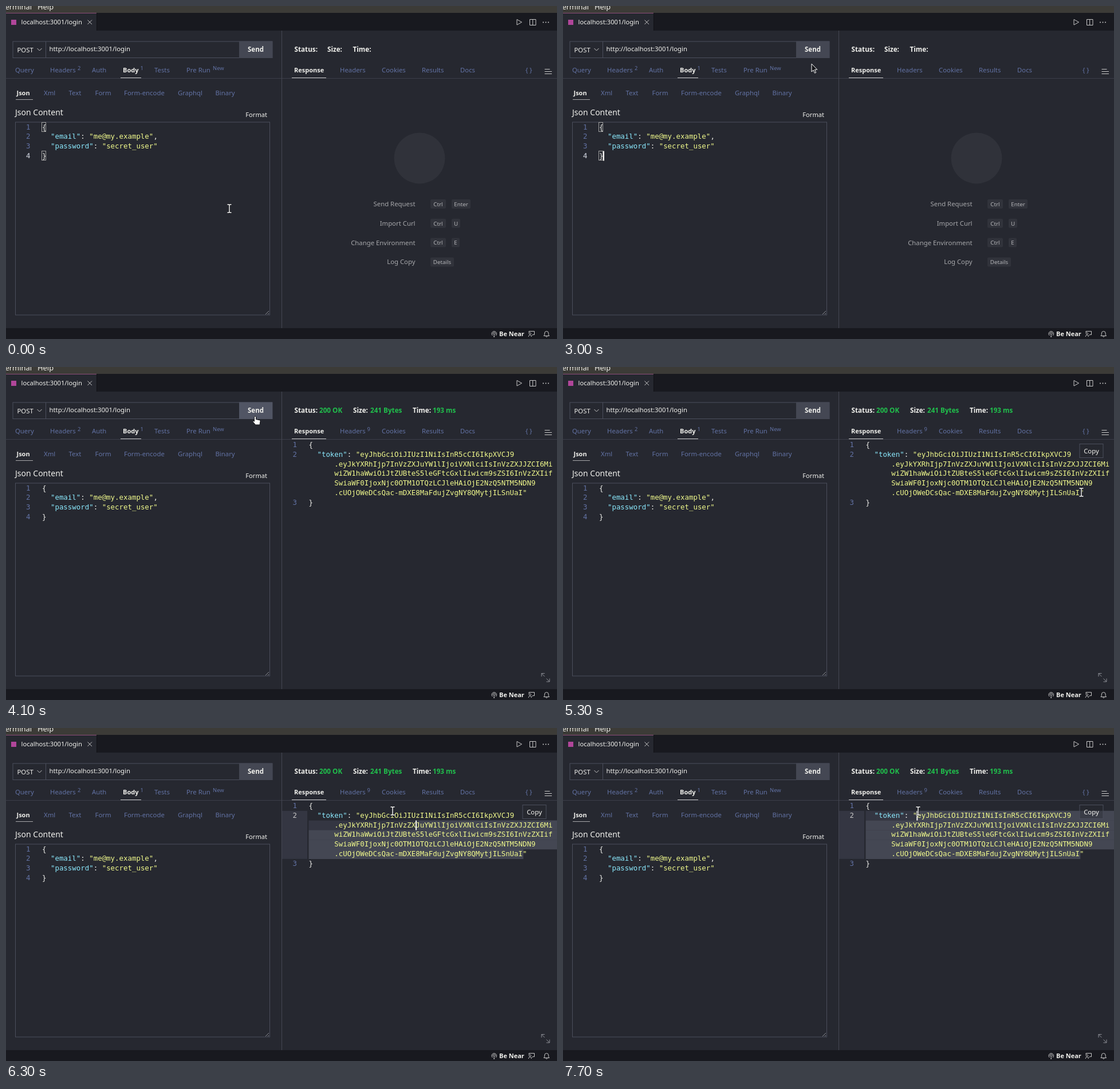
Animation of 962x582 px, one loop 8 s. Source, as an HTML page:

```html
<!DOCTYPE html>
<html lang="en">
<head>
<meta charset="utf-8">
<title>API client</title>
<style>
html, body { margin: 0; width: 100%; height: 100%; overflow: hidden; background: #262830; }
svg { display: block; }
text { font: 11.35px "Noto Sans", "Open Sans", sans-serif; fill: #f0f0ec; white-space: pre; }
.link { fill: #6272a4; }
.on { font-weight: 600; font-size: 11px; }
.b { font-weight: 600; font-size: 11.7px; }
.ok { fill: #20c04c; }
.sup { font-size: 9.4px; }
.dim { fill: #a6a7aa; }
.key { font-size: 9.8px; fill: #b4b5b8; text-anchor: middle; }
.mono { font: 12.42px "DejaVu Sans Mono", monospace; }
.num { fill: #6272a4; }
.now { fill: #c6c6c6; }
.k { fill: #8be9fd; }
.s { fill: #f1fa8c; }
.icon { fill: none; stroke: #c8c8c8; stroke-width: 1; }
.faint { stroke: #8d8f96; }
</style>
</head>
<body>
<svg id="stage" width="962" height="582" viewBox="0 0 962 582"></svg>
<script>
const stage = document.getElementById('stage');
const ROW = 16.8, CH = 7.477;
const SELECTED = '#444753';

function el(tag, attrs, parent = stage) {
  const node = document.createElementNS('http://www.w3.org/2000/svg', tag);
  for (const name in attrs) node.setAttribute(name, attrs[name]);
  parent.appendChild(node);
  return node;
}
function text(x, y, str, cls = '', parent = stage, anchor = 'start') {
  const node = el('text', { x, y, class: cls, 'text-anchor': anchor }, parent);
  node.textContent = str;
  return node;
}
const rect = (x, y, width, height, fill, parent, more) =>
  el('rect', { x, y, width, height, fill, ...more }, parent);
const icon = (d, parent, cls = '') => el('path', { d, class: 'icon ' + cls }, parent);
const group = parent => el('g', {}, parent);
const show = (node, on) => node.setAttribute('visibility', on ? 'visible' : 'hidden');

// parts: [text, class] pairs laid out on the fixed character grid
function code(x, y, parts, parent) {
  for (const [str, cls] of parts) {
    text(x, y, str, 'mono ' + cls, parent);
    x += str.length * CH;
  }
}

// Window frame
rect(0, 0, 962, 12, '#3c3b37');
text(45, 6, 'Terminal', '', stage, 'end').style.fontSize = '12.9px';
text(55, 6, 'Help').style.fontSize = '12.9px';
rect(0, 12, 962, 31, '#18191f');
rect(0, 12, 158, 31, '#262830');
rect(0, 12, 158, 1, '#8c4c78');
rect(158, 12, 1, 31, '#111217');
rect(9, 24, 9, 9, '#b0469a');
text(26.5, 32, 'localhost:3001/login').style.fontSize = '11.2px';
icon('M142.5 24.5l7.5 7.5M150 24.5l-7.5 7.5');
icon('M892 23.5v9.5l8.5-4.75z');
icon('M914.5 23.5h10.5v10h-10.5zM919.7 23.5v10');
for (const x of [938, 942.5, 947]) el('circle', { cx: x, cy: 28.5, r: 1, fill: '#c8c8c8' });
rect(481, 43, 1, 520, '#454752');
rect(0, 563, 962, 19, '#18191f');
icon('M849.5 576a4.2 4.2 0 1 1 5.5 0M850.8 573.8a2 2 0 1 1 2.9 0M852.2 572.5v6M851.2 578h2');
text(861, 577, 'Be Near', 'on');
icon('M913 571v-2.500h9.500v6h-3l-2 2M912.300 578c0-4 5-4 5 0M914.800 570.8a1.700 1.700 0 1 0 .1 0');
icon('M939 576.500h9.500l-1.300-2v-2.500a3.400 3.400 0 0 0-6.900 0v2.500zM942.5 577.500a1.400 1.400 0 0 0 2.600 0');

// Request panel
rect(12, 62, 453, 28.5, 'none', stage, { stroke: '#4b4e5c' });
rect(69, 62, 1, 28, '#4b4e5c');
const send = rect(407, 61.5, 58, 29.5, SELECTED);
text(19.5, 81, 'POST');
icon('M54.500 74l4 4 4-4');
text(75.5, 79, 'http://localhost:3001/login');
text(436, 80, 'Send', 'on', stage, 'middle').style.fontSize = '11.5px';

rect(0, 126, 481, 1, '#3c3e49');
rect(482, 126, 480, 1, '#3c3e49');
const tabs = (y, list, active) => list.forEach(([x, name]) =>
  text(x, y, name, name === active ? 'on' : 'link'));
tabs(116, [[16, 'Query'], [77, 'Headers'], [150, 'Auth'], [204, 'Body'], [259, 'Tests'], [315, 'Pre Run']], 'Body');
tabs(156, [[18.5, 'Json'], [66, 'Xml'], [109.5, 'Text'], [155.5, 'Form'], [206, 'Form-encode'],
  [300, 'Graphql'], [365.5, 'Binary']], 'Json');
tabs(116, [[503, 'Response'], [583, 'Headers'], [656, 'Cookies'], [726, 'Results'], [793, 'Docs']], 'Response');
text(125, 112, '2', 'link sup');
text(234.5, 112, '1', 'link sup');
text(361, 112, 'New', 'link sup');
rect(200, 125, 36, 1, '#c8c8c8');
rect(17, 163, 30, 1, '#a8a8aa');
rect(499, 125, 60, 1, '#c8c8c8');
text(907, 116, '{ }', 'link');
icon('M940.5 110.500h9M940.5 114.500h12.500M940.5 118.500h12.500');

const title = text(16, 190.5, 'Json Content');
title.style.cssText = 'font-size:14px;font-weight:300';
text(456, 194, 'Format', '', stage, 'end').style.fontSize = '11.1px';
rect(16.5, 203, 444, 337, 'none', stage, { stroke: '#4b4e5c' });
icon('M453 539l6-6M457 539l2-2', stage, 'faint');
const line = n => 215.5 + ROW * n;
for (let n = 0; n < 4; n++) text(35, line(n), n + 1, 'mono num');
code(63, line(0), [['{', '']]);
code(63 + 2 * CH, line(1), [['"email"', 'k'], [': ', ''], ['"me@my.example"', 's'], [',', '']]);
code(63 + 2 * CH, line(2), [['"password"', 'k'], [': ', ''], ['"secret_user"', 's']]);
code(63, line(3), [['}', '']]);

const focus = group();
text(35, line(3), '4', 'mono now', focus);
for (const y of [203.5, 253.5]) rect(62.5, y, 7, 16, 'none', focus, { stroke: '#a0a0a0' });
const caret = rect(70, 253.5, 2, 17, '#f8f8f2', focus);

// Empty response panel
const idle = group(), welcome = group(idle);
text(503.5, 80, 'Status:', 'b', idle);
text(561, 80, 'Size:', 'b', idle);
text(605.5, 80, 'Time:', 'b', idle);
el('circle', { cx: 722, cy: 266, r: 44.5, fill: '#30323a' }, welcome);
const shortcuts = [['Send Request', 'Ctrl', 'Enter', 33], ['Import Curl', 'Ctrl', 'U', 15],
  ['Change Environment', 'Ctrl', 'E', 14], ['Log Copy', 'Details']];
function keycap(x, y, w, label) {
  rect(x, y - 8, w, 16, '#31333b', welcome, { rx: 2 });
  text(x + w / 2, y + 3.7, label, 'key', welcome);
}
shortcuts.forEach(([name, first, second, w], i) => {
  const y = 346 + 33.8 * i;
  text(714.5, y + 4, name, 'dim', welcome, 'end');
  keycap(741, y, second ? 27 : 41, first);
  if (second) keycap(778, y, w, second);
});

// Filled response panel
const reply = group();
[[503.5, 'Status:', 547, '200 OK'], [606, 'Size:', 636, '241 Bytes'], [710, 'Time:', 745, '193 ms']]
  .forEach(([x, name, vx, value]) => {
    text(x, 80, name, 'b', reply);
    text(vx, 80, value, 'b ok', reply);
  });
text(630.5, 112, '9', 'link sup', reply);
const selection = group(reply);
const LEFT = 528.5;
const row = n => 140 + ROW * n;
code(LEFT, row(0), [['{', '']], reply);
code(LEFT + 2 * CH, row(1), [['"token"', 'k'], [': ', ''], ['"eyJhbGciOiJIUzI1NiIsInR5cCI6IkpXVCJ9', 's']], reply);
['.eyJkYXRhIjp7InVzZXJuYW1lIjoiVXNlciIsInVzZXJJZCI6Mi',
  'wiZW1haWwiOiJtZUBteS5leGFtcGxlIiwicm9sZSI6InVzZXIif',
  'SwiaWF0IjoxNjc0OTM1OTQzLCJleHAiOjE2NzQ5NTM5NDN9',
  '.cUOjOWeDCsQac-mDXE8MaFdujZvgNY8QMytjILSnUaI"']
  .forEach((str, i) => code(LEFT + 6 * CH, row(i + 2), [[str, 's']], reply));
code(LEFT, row(6), [['}', '']], reply);
const numbers = [0, 1, 6].map((n, i) => text(500.5, row(n), i + 1, 'mono num', reply));
icon('M935 541v-5.500h5.500M935 535.500l5.500 5.500M949 544.500v5.500h-5.500M949 550l-5.500-5.500', reply, 'faint');
const mark = group(reply);
const copy = group(reply);
rect(902, 134.5, 41, 24, '#262830', copy, { 'fill-opacity': .35, stroke: '#4b4e5c' });
text(922.5, 151, 'Copy', '', copy, 'middle');

// Pointer shapes, each with its hot spot at 0,0
function pointer(d, outlined) {
  const g = group();
  if (outlined) {
    el('path', { d, fill: 'none', stroke: '#15161a', 'stroke-width': 3 }, g);
    el('path', { d, fill: 'none', stroke: '#fff', 'stroke-width': 1.4 }, g);
  } else el('path', { d, fill: '#fff', stroke: '#15161a', 'stroke-linejoin': 'round' }, g);
  return g;
}
const pointers = {
  beam: pointer('M-3.500-7h2.500l1 1 1-1h2.500M0-6V6M-3.500 7h2.500l1-1 1 1h2.500', true),
  arrow: pointer('M0 0v14l3.200-3 2.300 5.300 2.200-1-2.300-5.100h4.400z'),
  hand: pointer('M-1.500 1q1.500-2 3 0v4.500l6 1.200q1.500.5 1.500 2l-1 6.300h-7.500l-4.500-5.500q0-1.800 1.500-1.200l1 1z')
};
pointers.arrow.firstChild.setAttribute('fill', '#15161a');
pointers.arrow.firstChild.setAttribute('stroke', '#fff');

const path = [[100, 390, 354], [400, 340, 280], [700, 301, 227], [900, 301, 227], [1100, 310, 240],
  [1300, 306, 249], [1600, 252, 230], [1700, 252, 230], [1800, 252, 247], [1900, 252, 247],
  [2200, 272, 227], [2600, 292, 248], [2700, 292, 248], [2800, 431, 128], [2900, 431, 128],
  [3000, 434, 101], [3300, 435, 86], [4200, 435, 86], [4300, 456, 87], [4500, 456, 87],
  [4600, 475, 105], [4800, 600, 200], [5000, 760, 270], [5100, 830, 272], [5300, 905, 219],
  [5500, 905, 219], [5600, 888, 204], [5700, 888, 204], [6000, 780, 180], [6300, 675, 145],
  [6600, 624.5, 134], [6900, 624.5, 134], [7300, 620, 168], [7500, 620, 168], [7700, 620, 145]];
// Selection start over time: time, row, x
const drag = [[5600, 4, 888], [5800, 3, 865], [6000, 3, 776], [6200, 2, 746], [6300, 2, 716],
  [6400, 1, 656], [6500, 0, 536], [7100, 1, 626], [7200, 2, 618.3], [7700, 1, 618.3]];

function along(t) {
  const i = path.findIndex(p => p[0] > t);
  if (i === 0) return path[0].slice(1);
  if (i < 0) return path[path.length - 1].slice(1);
  const [t0, x0, y0] = path[i - 1], [t1, x1, y1] = path[i], k = (t - t0) / (t1 - t0);
  return [x0 + (x1 - x0) * k, y0 + (y1 - y0) * k];
}

function drawSelection(t) {
  selection.replaceChildren();
  mark.replaceChildren();
  const now = drag.filter(d => d[0] <= t).pop();
  const active = now ? Math.min(now[1], 1) : -1;
  numbers.forEach((n, i) => n.setAttribute('class', i === active ? 'mono now' : 'mono num'));
  if (!now) return;
  const [, first, x] = now, top = n => 128 + ROW * n;
  // The gutter lights up along the whole wrapped line, the text area only on the caret's row
  rect(482, top(active), 44, ROW * (active ? 5 : 1), '#343642', selection);
  rect(LEFT, top(first), 962 - LEFT, ROW, '#343642', selection);
  for (let r = first; r <= 5; r++) {
    const from = r === first ? x : LEFT;
    const to = r === 0 ? from + CH : r === 5 ? 903.3 : 962;
    rect(from, top(r), to - from, ROW + .2, SELECTED, selection);
  }
  if (first === 0)
    for (const r of [0, 6]) rect(LEFT, top(r) + .5, 7, 16, 'none', mark, { stroke: '#a0a0a0' });
  rect(x - 1, top(first), 2, ROW, '#f8f8f2', mark);
}

let last = -1;
function frame(ms) {
  const t = Math.floor(ms % 8000 / 100) * 100;
  if (t !== last) {
    last = t;
    const shape = t < 2800 ? 'beam' : t < 3200 ? 'arrow' : t < 4600 ? 'hand' : t < 4700 ? 'arrow' : 'beam';
    for (const name in pointers) show(pointers[name], name === shape);
    pointers[shape].setAttribute('transform', `translate(${along(t)})`);
    send.setAttribute('fill', shape === 'hand' ? '#515564' : SELECTED);
    focus.style.display = t < 3500 ? '' : 'none';
    show(caret, Math.floor((t - 20) / 500) % 2 === 1);
    idle.style.display = t < 4100 ? '' : 'none';
    welcome.style.display = t < 3700 ? '' : 'none';
    reply.style.display = t < 4100 ? 'none' : '';
    copy.style.display = t < 4700 ? 'none' : '';
    drawSelection(t);
  }
  requestAnimationFrame(() => frame(performance.now() - start));
}
const start = performance.now();
frame(0);
</script>
</body>
</html>
```
